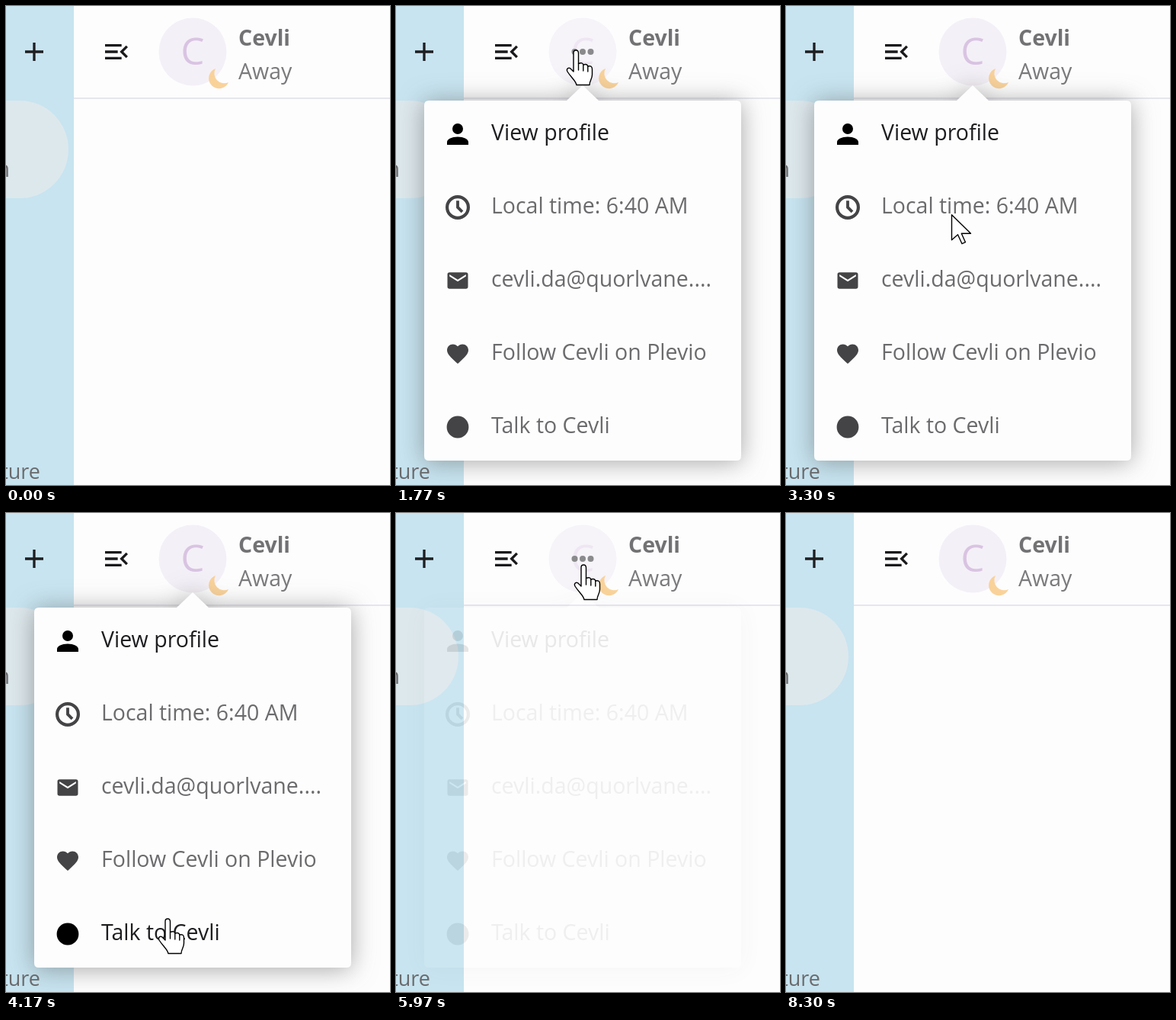
Animation, 504 px wide and 628 px high, one loop 8.33 s. Source, as an HTML page:

```html
<!DOCTYPE html>
<html lang="en">
<head>
<meta charset="utf-8">
<title>Contact menu</title>
<style>
  html, body { margin: 0; width: 100%; height: 100%; overflow: hidden; background: #fdfdfe; }
  svg { display: block; width: 504px; height: 628px; }
  text { font: 28.5px "Open Sans", "Noto Sans", sans-serif; }
  .card { fill: #fdfdfe; filter: drop-shadow(0 2px 16px rgba(77, 77, 77, .5)); }
  .row { fill: #6b6b6d; }
  .row .icon { fill: #444446; }
  .row.on { fill: #1e1e20; }
  .row.on .icon { fill: #000; }
  .cursor { fill: #fff; stroke: #000; stroke-width: 1.4; stroke-linejoin: round; stroke-linecap: round; }
</style>
</head>
<body>
<svg viewBox="0 0 504 628">
  <rect width="504" height="628" fill="#fdfdfe"/>
  <rect width="89" height="628" fill="#c7e4f0"/>
  <rect x="-100" y="124" width="182" height="128" rx="64" fill="#dde8ed"/>
  <path d="M25 60H49M37 48V72" stroke="#1e1e20" stroke-width="3.3"/>
  <g fill="#6b6b6d">
    <text x="5" y="224" text-anchor="end">n</text>
    <text x="45" y="620" text-anchor="end" style="font-size:27px">ture</text>
  </g>

  <path d="M89 121H504" stroke="#e6e6ee" stroke-width="2"/>
  <path transform="translate(125 40) scale(1.667)" fill="#1a1a1c"
    d="M21 15.61L19.59 17L14.58 12L19.59 7L21 8.39L17.44 12ZM3 6H16V8H3ZM3 11H13V13H3ZM3 16H16V18H3Z"/>
  <g id="face">
    <circle cx="245" cy="60" r="44.5" fill="#f4f0f7"/>
    <text id="initial" x="245" y="77" text-anchor="middle" fill="#d9c3e2" style="font-size:49px">C</text>
  </g>
  <g id="dots" fill="#8a8a8c">
    <circle cx="234.5" cy="60" r="4"/><circle cx="245" cy="60" r="4"/><circle cx="255.5" cy="60" r="4"/>
  </g>
  <path d="M275 82A13.5 13.5 0 1 0 292 100A13 13 0 0 1 275 82Z" fill="#f9d29a"/>
  <text x="305" y="52" fill="#727274" style="font-weight:700">Cevli</text>
  <text x="305" y="96" fill="#7a7a7c">Away</text>

  <g id="menu">
    <path class="card" d="M43 124H224L245 104L266 124H447Q453 124 453 130V590Q453 596 447 596H43Q37 596 37 590V130Q37 124 43 124Z"/>
    <g id="rows"></g>
  </g>

  <g id="pointer" class="cursor">
    <path id="arrow" d="M0 0V33L8 26L13.5 38L18 36L12.8 24.5H25Z"/>
    <g id="hand">
      <path d="M-3 3.5Q-3 0 .2 0Q3.5 0 3.5 4V17.5Q9 15.5 9.8 19Q15 17.5 15.8 21Q21.5 19.5 21.5 25V32C21.5 38 18 40 18 45.5H1C0 40 -6 36 -11 28C-13 24 -9 21.5 -6 25L-3 28Z"/>
      <path fill="none" d="M3.5 17.5V26M9.8 19V27M15.8 21V28"/>
    </g>
  </g>
</svg>

<script>
const LOOP = 8330;
const $ = id => document.getElementById(id);

// label, icon path on a 24 unit grid, icon scale
const items = [
  ["View profile", "M12 4A4 4 0 0 1 12 12A4 4 0 0 1 12 4M12 14C16.42 14 20 15.79 20 18V20H4V18C4 15.79 7.58 14 12 14Z", 1.75],
  ["Local time: 6:40 AM", "M12 2A10 10 0 0 1 12 22A10 10 0 0 1 12 2ZM12 4.6A7.4 7.4 0 0 0 12 19.4A7.4 7.4 0 0 0 12 4.6ZM10.8 6.5H13.2V11.4L16.6 14.8L14.9 16.5L10.8 12.4Z", 1.6],
  ["cevli.da@quorlvane....", "M20 8L12 13L4 8V6L12 11L20 6ZM20 4H4A2 2 0 0 0 2 6V18A2 2 0 0 0 4 20H20A2 2 0 0 0 22 18V6A2 2 0 0 0 20 4Z", 1.35],
  ["Follow Cevli on Plevio", "M12 21.35L10.55 20.03C5.4 15.36 2 12.27 2 8.5C2 5.41 4.42 3 7.5 3C9.24 3 10.91 3.81 12 5.08C13.09 3.81 14.76 3 16.5 3C19.58 3 22 5.41 22 8.5C22 12.27 18.6 15.36 13.45 20.03Z", 1.4],
  ["Talk to Cevli", "M12 3A9 9 0 0 1 12 21A9 9 0 0 1 12 3Z", 1.6]
];
$("rows").innerHTML = items.map(([label, d, size], i) => `
  <g class="row" transform="translate(0 ${i * 96})">
    <path class="icon" fill-rule="evenodd" d="${d}" transform="translate(81 168) scale(${size}) translate(-12 -12)"/>
    <text x="125" y="176">${label}</text>
  </g>`).join("");
const rows = [...$("rows").children];

// pointer path: time, x, y
const path = [
  [0, 530, 6], [250, 530, 6], [800, 236, 58], [1900, 236, 58], [2530, 219, 205],
  [3050, 219, 205], [3900, 212, 532], [4350, 212, 532], [4870, 231, 192],
  [5080, 240, 6], [5500, 246, 68], [6150, 246, 68], [6600, 530, 30], [LOOP, 530, 30]
];

const ramp = (t, a, b) => Math.min(1, Math.max(0, (t - a) / (b - a)));
const show = (el, on) => el.style.display = on ? "" : "none";

function pointerAt(t) {
  const i = path.findIndex(p => p[0] > t);
  const [t0, x0, y0] = path[i - 1], [t1, x1, y1] = path[i];
  const u = ramp(t, t0, t1), k = u * u * (3 - 2 * u);
  return [x0 + (x1 - x0) * k, y0 + (y1 - y0) * k];
}

function draw(t) {
  const [x, y] = pointerAt(t);
  const alpha = ramp(t, 1450, 1600) - ramp(t, 5830, 5985);
  const onFace = Math.hypot(x - 245, y - 60) < 45;
  const row = alpha > .5 && y >= 118 ? Math.floor((y - 118) / 96) : -1;
  const rushing = t > 4550 && t < 4900;
  const hand = !rushing && (onFace || (row >= 0 && row !== 1));

  $("menu").style.opacity = alpha;
  show($("menu"), alpha > 0);
  rows.forEach((el, i) => el.classList.toggle("on", i === 0 || (i === row && i !== 1)));
  $("face").style.opacity = onFace ? .7 : 1;
  $("initial").style.opacity = onFace ? .4 : 1;
  show($("dots"), onFace);
  $("pointer").setAttribute("transform", `translate(${x.toFixed(1)} ${y.toFixed(1)})`);
  show($("hand"), hand);
  show($("arrow"), !hand);
}

const start = performance.now();
function tick() {
  draw((performance.now() - start) % LOOP);
  requestAnimationFrame(tick);
}
tick();
</script>
</body>
</html>
```
